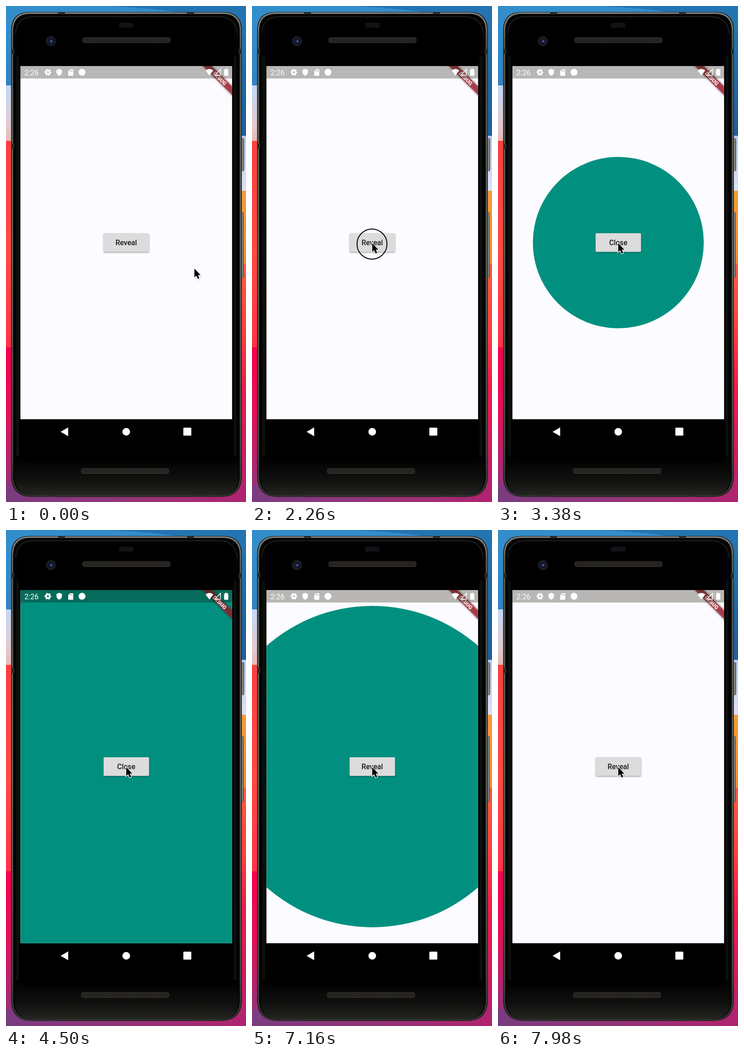
Animation, 521 px wide and 1074 px high, one loop 8000 ms. Source, as an HTML page:

```html
<!DOCTYPE html>
<html lang="en">
<head>
<meta charset="utf-8">
<title>Circular reveal</title>
<style>
  html, body { margin: 0; width: 100%; height: 100%; overflow: hidden; background: #000; }
  svg { display: block; width: 521px; height: 1074px; }
  text { font-family: Roboto, Arial, sans-serif; }
</style>
</head>
<body>
<svg viewBox="0 0 521 1074">
  <defs>
    <linearGradient id="wallLeft" x2="0" y2="1">
      <stop offset="0" stop-color="#3590d0"/><stop offset=".16" stop-color="#3482c2"/>
      <stop offset=".16" stop-color="#c3d9f7"/><stop offset=".24" stop-color="#e2c9d0"/>
      <stop offset=".272" stop-color="#e5b9b4"/><stop offset=".272" stop-color="#f8403f"/>
      <stop offset=".5" stop-color="#ff4a43"/><stop offset=".688" stop-color="#ff3347"/>
      <stop offset=".688" stop-color="#f8004c"/><stop offset=".82" stop-color="#e31059"/>
      <stop offset=".93" stop-color="#ac2870"/><stop offset="1" stop-color="#7a3c80"/>
    </linearGradient>
    <linearGradient id="wallRight" x2="0" y2="1">
      <stop offset="0" stop-color="#2876b2"/><stop offset=".14" stop-color="#1c69a8"/>
      <stop offset=".262" stop-color="#205f9e"/><stop offset=".262" stop-color="#b4c9f2"/>
      <stop offset=".372" stop-color="#dce2f7"/><stop offset=".372" stop-color="#f69c38"/>
      <stop offset=".52" stop-color="#fb8a2e"/><stop offset=".52" stop-color="#ff5a3c"/>
      <stop offset=".65" stop-color="#ff4142"/><stop offset=".76" stop-color="#f21c4a"/>
      <stop offset=".9" stop-color="#d01a60"/><stop offset="1" stop-color="#a92772"/>
    </linearGradient>
    <linearGradient id="wallBottom">
      <stop offset="0" stop-color="#7a3c80"/><stop offset=".5" stop-color="#933377"/>
      <stop offset="1" stop-color="#b02470"/>
    </linearGradient>
    <linearGradient id="rim" x2="0" y2="1">
      <stop offset="0" stop-color="#85857e"/><stop offset=".06" stop-color="#5e5f59"/>
      <stop offset=".5" stop-color="#63645e"/><stop offset=".9" stop-color="#4a4b46"/>
      <stop offset="1" stop-color="#30312d"/>
    </linearGradient>
    <linearGradient id="chin" x2="0" y2="1">
      <stop offset="0" stop-color="#000"/><stop offset=".6" stop-color="#10110f"/>
      <stop offset="1" stop-color="#242521"/>
    </linearGradient>
    <linearGradient id="sideKey">
      <stop offset="0" stop-color="#34352f"/><stop offset=".6" stop-color="#92938b"/>
      <stop offset="1" stop-color="#55564f"/>
    </linearGradient>
    <pattern id="mesh" width="4" height="4" patternUnits="userSpaceOnUse">
      <rect width="4" height="4" fill="#211f1d"/><path d="M0 4L4 0" stroke="#35312b"/>
    </pattern>
    <clipPath id="screenClip"><rect x="31.300" y="130" width="459.500" height="764.700"/></clipPath>
    <filter id="soft" x="-30%" y="-60%" width="160%" height="220%"><feGaussianBlur stdDeviation="2.5"/></filter>
    <filter id="lift" x="-30%" y="-60%" width="160%" height="220%"><feGaussianBlur id="liftBlur" stdDeviation="1.5"/></filter>
    <path id="arrow" d="M0 0V19L4.200 15.200L7.400 22.600L10.700 21.100L7.700 13.900H13.300Z"/>
  </defs>

  <!-- wallpaper -->
  <rect width="261" height="1074" fill="url(#wallLeft)"/>
  <rect x="261" width="260" height="1074" fill="url(#wallRight)"/>
  <path d="M0 0H521V30H0Z" fill="#338dcb"/>
  <path d="M225 0Q330 6 375 14L400 30H521V0Z" fill="#2474b1"/>
  <rect y="1040" width="521" height="34" fill="url(#wallBottom)"/>

  <!-- phone body -->
  <g fill="url(#sideKey)" stroke="#33342f" stroke-width=".7">
    <rect x="509" y="287" width="7.500" height="70" rx="2"/>
    <rect x="509" y="447" width="6.500" height="141" rx="2"/>
  </g>
  <path d="M11 53Q11 13 51 13H472Q512 13 512 53V1017Q512 1063 466 1063H57Q11 1063 11 1017Z" fill="#1c1d1a"/>
  <path d="M14 54Q14 15.500 52 15.500H471Q509 15.500 509 54V1016Q509 1060.500 465 1060.500H58Q14 1060.500 14 1016Z" fill="#030303" stroke="url(#rim)" stroke-width="3"/>
  <path d="M11 93h7v11h-7zM505 93h7v11h-7zM11 298h7v12h-7zM393 13h15v5h-15zM113 13h15v5h-15zM92 1059h15v4h-15zM415 1059h15v4h-15z" fill="#292a27"/>
  <path d="M25 110V1000M497 110V1000" stroke="#0d0f0c" stroke-width="6"/>
  <path d="M21 60Q22 23 60 23H461Q499 23 502 60" fill="none" stroke="#1f211e" stroke-width="2"/>
  <path d="M18 975H505V1016Q505 1059 464 1059H59Q18 1059 18 1016Z" fill="url(#chin)"/>
  <rect x="29" y="30" width="465" height="960" rx="24" fill="#000"/>
  <rect x="245" y="36" width="32" height="11" rx="4" fill="#111116"/>
  <circle cx="97.500" cy="76" r="11" fill="#1b1b20"/>
  <circle cx="97.500" cy="76" r="6.500" fill="#10132a"/>
  <circle cx="97.500" cy="76" r="3.500" fill="#222f66"/>
  <circle cx="99" cy="76.500" r="1.300" fill="#8392c2"/>
  <g fill="url(#mesh)" stroke="#3b3936">
    <rect x="166.500" y="68.500" width="190" height="11" rx="4"/>
    <rect x="163.500" y="1001.500" width="190" height="11" rx="4"/>
  </g>
  <g fill="#fff">
    <path d="M118.500 922L135 912.500V931.500Z"/>
    <circle cx="261" cy="922" r="8.300"/>
    <rect x="385" y="913" width="17.300" height="17.300" rx="1.500"/>
  </g>

  <!-- app screen -->
  <g clip-path="url(#screenClip)">
    <rect x="31" y="130" width="460" height="765" fill="#fcfbff"/>
    <circle id="reveal" cx="261.200" cy="512.300" fill="#01907f"/>
    <rect id="shadow" x="212" y="493.500" width="98.500" height="40.500" rx="2" filter="url(#lift)"/>
    <rect id="button" x="211.800" y="492" width="98.700" height="40.500" rx="2"/>
    <text id="label" x="261" y="518" font-size="15.670" font-weight="500" text-anchor="middle" fill="#1b1b1b"></text>
    <g transform="translate(491 130) rotate(45)">
      <rect x="-50" y="31.300" width="100" height="13.500" opacity=".5" filter="url(#soft)"/>
      <rect x="-50" y="31.300" width="100" height="13.500" fill="#b71c2c" fill-opacity=".68"/>
      <text y="42.200" font-size="11.400" font-weight="900" text-anchor="middle" fill="#fff">DEBUG</text>
    </g>
    <rect x="31" y="130" width="460" height="27" fill="#141200" opacity=".29"/>
  </g>

  <!-- status bar -->
  <g fill="#fff">
    <text x="40" y="149.500" font-size="16">2:26</text>
    <g transform="translate(91 143.500)">
      <circle r="4" fill="none" stroke="#fff" stroke-width="3.500"/>
      <circle r="6" fill="none" stroke="#fff" stroke-width="2.600" stroke-dasharray="3.600 2.683" stroke-dashoffset="1.800"/>
    </g>
    <path d="M115.500 136L121.500 138.500V143Q121 149 115.500 151Q110 149 109.500 143V138.500Z"/>
    <path d="M139 137H145Q146 137 146 138V150Q146 151 145 151H136Q135 151 135 150V141Z"/>
    <path d="M138.500 139v3M141 139v3M143.500 139v3" stroke="#aaa99f" stroke-width="1.200"/>
    <circle cx="165" cy="143.500" r="7.500"/>
    <path d="M433 139.500Q441.500 133 450 139.500L441.500 150.500Z"/>
    <path d="M465.500 137V150H453.500Z" fill="none" stroke="#fff" stroke-width="1.600"/>
    <path d="M476 136h4v1.500h2.500V151h-9V137.500H476Z"/>
  </g>

  <circle id="ring" cx="260.500" cy="515.500" r="32.500" fill="none" stroke="#000" stroke-width="2"/>
  <g id="cursor">
    <use href="#arrow" transform="translate(1 2)" opacity=".3" filter="url(#soft)"/>
    <use href="#arrow" stroke="#fff" stroke-width="2.400" paint-order="stroke"/>
  </g>
</svg>
<script>
const LOOP = 8000, FULL_RADIUS = 446.5, DURATION = 1500;
const OPEN_AT = 2705, CLOSE_AT = 6673;
const el = id => document.getElementById(id);
const clamp = v => Math.min(1, Math.max(0, v));
const ramp = (t, start, length) => clamp((t - start) / length);
const mix = (a, b, p) => a + (b - a) * p;

// cubic-bezier(.42, 0, .58, 1), solved for x by bisection
function ease(x) {
  let lo = 0, hi = 1, s = x;
  for (let i = 0; i < 22; i++) {
    s = (lo + hi) / 2;
    const bx = 1.26 * s * (1 - s) ** 2 + 1.74 * s * s * (1 - s) + s ** 3;
    if (bx < x) lo = s; else hi = s;
  }
  return s * s * (3 - 2 * s);
}

const press = (t, down, up) => ramp(t, down, 80) * (1 - ramp(t, up, 180));

function draw(t) {
  const open = ease(ramp(t, OPEN_AT, DURATION)) - ease(ramp(t, CLOSE_AT, DURATION));
  el("reveal").setAttribute("r", FULL_RADIUS * open);

  const pressed = Math.max(press(t, 2270, 2460), press(t, 6020, 6200));
  const grey = Math.round(mix(220, 200, pressed));
  el("button").setAttribute("fill", `rgb(${grey},${grey},${grey})`);
  el("shadow").setAttribute("opacity", mix(0.38, 0.5, pressed));
  el("liftBlur").setAttribute("stdDeviation", mix(1.5, 4, pressed));
  el("label").textContent = t >= 2440 && t < 6130 ? "Close" : "Reveal";

  const move = ease(ramp(t, 750, 1000));
  el("cursor").setAttribute("transform", `translate(${mix(409, 261, move)} ${mix(568.5, 513.5, move)})`);
  el("ring").setAttribute("visibility", t >= 2200 && t < 2440 ? "visible" : "hidden");
}

const start = performance.now();
function tick() {
  draw((performance.now() - start) % LOOP);
  requestAnimationFrame(tick);
}
tick();
</script>
</body>
</html>
```
